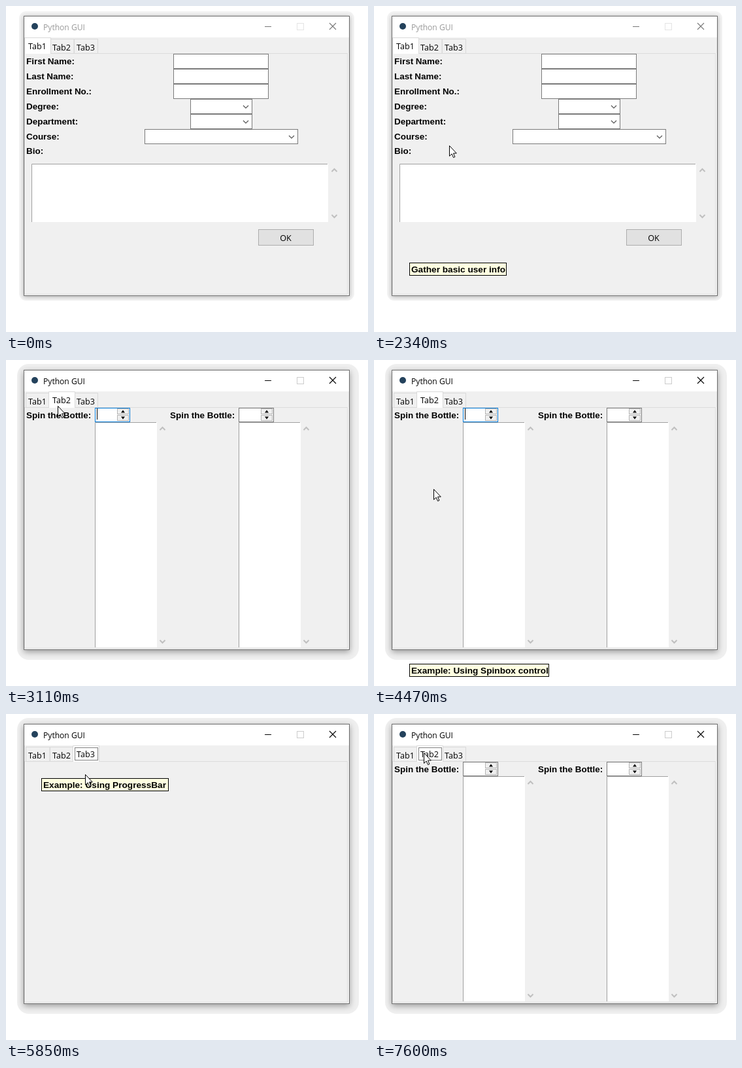
Animation of 554 by 498 pixels, one loop 8000 ms. Source, as an HTML page:

```html
<!DOCTYPE html>
<html lang="en">
<head>
<meta charset="utf-8">
<title>Python GUI</title>
<style>
html, body { margin: 0; width: 100%; height: 100%; overflow: hidden; background: #fff; }
svg { display: block; width: 100%; height: 100%; }
text { white-space: pre; }
.ui { font: 12.6px "Open Sans", "Noto Sans", sans-serif; }
.title { font-size: 12.1px; }
.label { font: bold 13.45px "Liberation Sans", Arial, sans-serif; }
.tip { font: bold 13.65px "Liberation Sans", Arial, sans-serif; }
.shade { filter: drop-shadow(0 2px 4px rgba(0, 0, 0, .3)); }
</style>
</head>
<body>
<svg id="stage" viewBox="0 0 554 498" xmlns="http://www.w3.org/2000/svg"></svg>
<script>
const LOOP = 8000;
const stage = document.getElementById('stage');

// Boxes take outer pixel edges; the 1px border lies inside them.
const box = (x0, y0, x1, y1, fill, stroke, more = '') =>
  `<rect x="${x0 + .5}" y="${y0 + .5}" width="${x1 - x0 - 1}" height="${y1 - y0 - 1}" fill="${fill}" stroke="${stroke}" ${more}/>`;
const line = (d, color, width = 1, more = '') =>
  `<path d="${d}" fill="none" stroke="${color}" stroke-width="${width}" ${more}/>`;
const text = (x, y, s, cls, more = '') => `<text x="${x}" y="${y}" class="${cls}" ${more}>${s}</text>`;
const group = (id, body) => `<g id="${id}">${body}</g>`;

const chevron = (x, y, dir, color, width) =>
  line(`M${x - 4} ${y - 2 * dir}l4 ${4 * dir}l4 ${-4 * dir}`, color, width);
const scrollArrows = (x, top, bottom) =>
  chevron(x, top, -1, '#bfbfbf', 2) + chevron(x, bottom, 1, '#bfbfbf', 2);
const textArea = (x0, y0, x1, y1) =>
  `<rect x="${x0}" y="${y0}" width="${x1 - x0}" height="${y1 - y0}" fill="#fff"/>` +
  line(`M${x0 + .5} ${y1}V${y0 + .5}H${x1 - 1}`, '#a0a0a0');

const entry = (x0, y0, x1) => box(x0, y0, x1, y0 + 23, '#fff', '#7a7a7a');
const combo = (x0, y0, x1) => entry(x0, y0, x1) + chevron(x1 - 10, y0 + 12, 1, '#555', 1.2);

const spinButton = (x, y, dir) =>
  box(x, y, x + 18, y + 9, '#f0f0f0', '#b4b4b4') +
  `<path d="M${x + 6} ${y + 4.5 + 2 * dir}h6l-3 ${-4 * dir}z"/>`;
const spinColumn = (x, id) =>
  text(x, 89, 'Spin the Bottle:', 'label') +
  textArea(x + 105, 95, x + 200, 439) + scrollArrows(x + 208.5, 105, 430) +
  box(x + 105, 73, x + 159, 95, '#fff', '#7a7a7a', `id="${id}"`) +
  spinButton(x + 139, 74, 1) + spinButton(x + 139, 84, -1);

const labels = ['First Name:', 'Last Name:', 'Enrollment No.:', 'Degree:', 'Department:', 'Course:', 'Bio:'];
const form =
  labels.map((s, i) => text(31, i < 6 ? 89 + 23 * i : 226, s, 'label')).join('') +
  [73, 96, 119].map(y => entry(256, y, 402)).join('') +
  combo(282, 142, 377) + combo(282, 165, 377) + combo(212, 188, 447) +
  textArea(39, 241, 493, 330) + scrollArrows(502.5, 251, 321) +
  box(386, 341, 471, 366, '#e1e1e1', '#adadad') +
  text(428, 359, 'OK', 'ui', 'text-anchor="middle"');

const spinners = spinColumn(31, 'spin') + spinColumn(251, 'spin2') +
  '<rect id="caret" x="139" y="74" width="1" height="17"/>';

const tips = [
  { s: 'Gather basic user info', y: 392, right: 203, below: 76 },
  { s: 'Example: Using Spinbox control', y: 464, right: 268, below: 97 },
  { s: 'Example: Using ProgressBar', y: 98, right: 249, below: 76 }
];
const tip = (t, i) => group('tip' + i,
  box(54, t.y, t.right, t.y + 20, '#ffffe1', '#000') + text(57, t.y + 15, t.s, 'tip'));

const tab = i => group('tab' + i,
  `<path stroke="#d9d9d9"/>` + text(34 + 37 * i, 68, 'Tab' + (i + 1), 'ui') +
  box(31 + 37 * i, 51, 67 + 37 * i, 71, 'none', '#000', 'stroke-dasharray="1 1"'));

stage.innerHTML =
  '<rect id="halo"/>' +
  box(27, 15, 526, 443, '#f0f0f0', '#6e6e6e', 'class="shade" id="frame"') +
  '<rect x="28" y="16" width="497" height="32" fill="#fff"/>' +
  '<circle cx="44" cy="31" r="5" fill="#24425c"/>' +
  text(57, 37, 'Python GUI', 'ui title', 'id="title"') +
  line('M396 31.5h10', '#000', 1, 'id="min"') +
  box(445, 26, 456, 37, 'none', '#ccc', 'id="max"') +
  line('M495 26l10 10m0-10l-10 10', '#000', 1.1, 'id="close"') +
  box(28, 72, 523, 441, '#f0f0f0', '#dcdcdc') +
  line('M28 441.5H523.5V72', '#fafafa') +
  [0, 1, 2].map(tab).join('') +
  group('page0', form) + group('page1', spinners) + group('page2', '') +
  tips.map(tip).join('') +
  group('cursor', '<path d="M.5 .5V16.3L4.1 12.9L6.6 18.5L8.9 17.5L6.5 12H11.3Z" fill="#fff" stroke="#000"/>');

const $ = id => document.getElementById(id);
const show = (el, on) => el.setAttribute('visibility', on ? 'visible' : 'hidden');
const set = (el, attrs) => { for (const k in attrs) el.setAttribute(k, attrs[k]); };

// Mouse moves: start, end, steps, then first and last pointer position.
const moves = [
  [1350, 1510, 4, 279, 431, 190, 336],
  [1990, 2190, 4, 188, 336, 182, 336],
  [2340, 2830, 8, 115, 213, 79, 70],
  [3510, 3760, 6, 80, 90, 88, 232],
  [4470, 4920, 8, 91, 197, 122, 69],
  [5070, 5070, 1, 123, 69, 123, 69],
  [5850, 6200, 7, 121, 92, 95, 247],
  [6710, 7050, 7, 96, 212, 76, 59]
];

function pointer(t) {
  const m = moves.filter(m => m[0] <= t).pop();
  if (!m) return null;
  const [start, end, n, x0, y0, x1, y1] = m;
  const k = end > start ? Math.min(1, (t - start) / (end - start)) : 1;
  const u = n > 1 ? Math.floor(k * (n - 1) + 1e-6) / (n - 1) : 1;
  const e = u * (2 - u);
  return { x: Math.round(x0 + (x1 - x0) * e), y: Math.round(y0 + (y1 - y0) * e) };
}

function drawTab(i, selected, hover, focus) {
  const [shape, label, ring] = $('tab' + i).children;
  const grow = selected ? 2 : 0;
  const left = 30.5 + 37 * i - grow, right = 66.5 + 37 * i + grow + (i === 2 ? 0 : .5 - grow / 4);
  const top = selected ? 48.5 : 50.5, bottom = selected ? 73 : 72.5;
  set(shape, {
    d: `M${left} ${bottom}V${top}H${right}V${bottom}` + (selected ? '' : 'Z'),
    fill: selected ? '#fff' : hover ? '#d9ebf9' : '#f0f0f0'
  });
  label.setAttribute('y', selected ? 66 : 68);
  show(ring, selected && focus);
}

function draw(t) {
  const active = t >= 3070;
  const page = t < 3110 ? 0 : t < 5270 ? 1 : t < 7600 ? 2 : 1;
  const typing = page === 1 && t < 5270;
  const p = pointer(t);

  set($('halo'), active
    ? { x: 17, y: 6, width: 523, height: 452, rx: 18, fill: '#efefef' }
    : { x: 20, y: 8, width: 513, height: 442, rx: 11, fill: '#f3f3f3' });
  $('frame').style.filter = active
    ? 'drop-shadow(0 3px 5px rgba(0,0,0,.36))'
    : 'drop-shadow(0 1px 3px rgba(0,0,0,.3))';
  $('title').setAttribute('fill', active ? '#000' : '#999');
  $('min').setAttribute('stroke', active ? '#000' : '#777');
  $('close').setAttribute('stroke', active ? '#000' : '#777');
  $('max').setAttribute('stroke', active ? '#ccc' : '#e4e4e4');

  for (let i = 0; i < 3; i++) {
    const over = p && p.y >= 51 && p.y < 72 && p.x >= 30 + 37 * i && p.x < 67 + 37 * i;
    drawTab(i, i === page, over, t >= 5270);
    show($('page' + i), i === page);
    show($('tip' + i), i === page && p && p.y > tips[i].below);
  }
  // The selected tab overlaps its neighbours.
  stage.insertBefore($('tab' + page), $('page0'));

  $('spin').setAttribute('stroke', typing ? '#0078d7' : '#7a7a7a');
  show($('caret'), typing && (t - 3080) % 900 < 600);
  show($('cursor'), p);
  if (p) $('cursor').setAttribute('transform', `translate(${p.x} ${p.y})`);
}

const began = performance.now();
function tick() {
  draw((performance.now() - began) % LOOP);
  requestAnimationFrame(tick);
}
tick();
</script>
</body>
</html>
```
